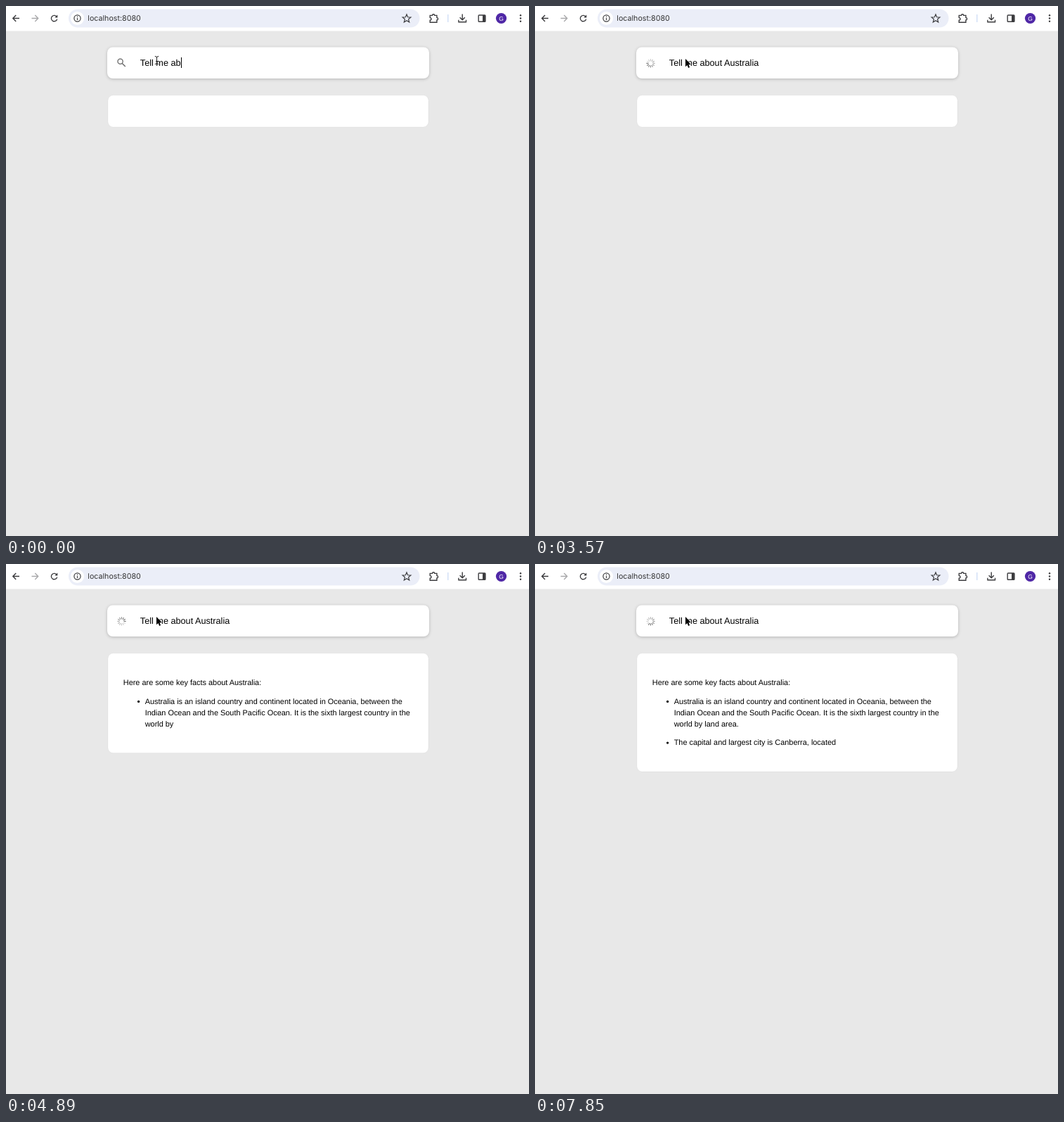
Write an HTML page that moves like this. It is 744 by 753 pixels and loops after 8000 ms.

```html
<!DOCTYPE html>
<html lang="en">
<head>
<meta charset="utf-8">
<title>Ask</title>
<style>
  html, body { margin: 0; width: 100%; height: 100%; overflow: hidden; background: #e8e8e8; }
  svg { display: block; }
  text { font-family: "Liberation Sans", Arial, sans-serif; text-rendering: geometricPrecision; white-space: pre; }
  #query { font-size: 12.68px; }
  #answer { font-size: 10.92px; }
  .box { fill: #fff; filter: drop-shadow(0 1px 2px rgba(0, 0, 0, .22)); }
  .line { fill: none; stroke: #3c3c3f; stroke-width: 1.4; }
</style>
</head>
<body>
<svg width="744" height="753" viewBox="0 0 744 753">
  <!-- browser toolbar -->
  <rect width="744" height="35.5" fill="#fff"/>
  <rect x="89" y="4.5" width="499.5" height="26" rx="13" fill="#ebeef8"/>
  <circle cx="101.5" cy="17.5" r="9.5" fill="#fff"/>
  <g class="line">
    <path d="M19 17.5H10M14.2 13.1L9.8 17.5l4.4 4.4"/>
    <path d="M36.5 17.5H45.500M41.300 13.100l4.400 4.400l-4.400 4.400" stroke="#a9a9ab"/>
    <path d="M72.2 15.400A4.200 4.200 0 1 0 72.700 18.600"/>
    <path d="M73.300 12.600v3.900h-3.900z" fill="#3c3c3f" stroke="none"/>
    <circle cx="101.500" cy="17.500" r="4.600" stroke-width="1.200"/>
    <path d="M101.500 16.900v3.100M101.500 14.700v1.300" stroke-width="1.200"/>
    <path d="M570 11.900l1.600 3.900 4.300.300-3.300 2.700 1.100 4.200-3.700-2.300-3.700 2.300 1.100-4.200-3.300-2.700 4.300-.300z" stroke-width="1.200"/>
    <path d="M603.200 13.400h3.300a1.600 1.600 0 0 1 3.200 0h3.200v3.200a1.600 1.600 0 0 1 0 3.400v3.300h-9.700v-3.100a1.800 1.800 0 0 0 0-3.600z"/>
    <path d="M628.800 12v11" stroke="#c8daf6" stroke-width="1.200"/>
    <path d="M649.200 11.500v8M645.600 16.200l3.600 3.600 3.600-3.600M643.900 19.800v3h10.600v-3"/>
    <rect x="672.200" y="13" width="9.700" height="9.200" rx=".8"/>
    <path d="M678 13h4v9.200h-4z" fill="#3c3c3f" stroke="none"/>
  </g>
  <circle cx="704.500" cy="17.500" r="7.600" fill="#4f27a6"/>
  <text x="704.500" y="20.600" font-size="8.500" text-anchor="middle" fill="#fff">G</text>
  <g fill="#3c3c3f">
    <circle cx="732" cy="13.200" r="1.200"/><circle cx="732" cy="17.500" r="1.200"/><circle cx="732" cy="21.800" r="1.200"/>
  </g>
  <text x="116.300" y="21.300" font-size="10.700" fill="#333" style="font-family:Inter,sans-serif">localhost:8080</text>

  <!-- search field -->
  <rect class="box" x="144" y="58.500" width="458" height="44.500" rx="8"/>
  <g id="lens" fill="none" stroke="#666" stroke-width="1.300">
    <circle cx="162.600" cy="78.800" r="3.600"/><path d="M165.300 81.500l4.500 4.500"/>
  </g>
  <g id="spinner" stroke="#444" stroke-width="1.100"></g>
  <text id="query" x="190.800" y="84.600"></text>
  <rect id="caret" y="73" width="1" height="15"/>
  <g id="beam" fill="none">
    <path id="beamPath" d="M211.800 71.500q2.700 0 2.700 1.600v7.800q0 1.600-2.700 1.600M217.200 71.500q-2.700 0-2.700 1.600v7.800q0 1.600 2.700 1.600M213 78.500h3" stroke="#222"/>
  </g>
  <path id="arrow" d="M214 75v11.200l2.500-2.300 1.700 4 1.900-.8-1.700-3.900h3.500z" stroke="#fff" stroke-width=".9" paint-order="stroke"/>

  <!-- answer card -->
  <rect id="card" x="145" y="126.800" width="456" rx="7.500" fill="#fff" stroke="#000" stroke-opacity=".04"/>
  <g id="answer"></g>
</svg>
<script>
const LOOP = 8000, SUBMIT = 2830, TICK = 148.2;
const $ = id => document.getElementById(id);
const query = "Tell me about Australia";

// [time, characters typed]
const typing = [[0, 10], [150, 11], [300, 12], [450, 13], [600, 14], [890, 15],
  [1340, 16], [1490, 17], [1640, 18], [1780, 19], [2080, 21], [2380, 23]];
// [time, words received]
const stream = [[0, 0], [3870, 3], [4020, 7], [4170, 9], [4310, 13], [4460, 19], [4610, 25],
  [4750, 30], [4890, 36], [7550, 38], [7700, 42], [7850, 46]];

// [x, baseline, card bottom, has bullet, text]
const lines = [
  [166.8, 171.9, 209.6, 0, "Here are some key facts about Australia:"],
  [197.7, 198.7, 236.5, 1, "Australia is an island country and continent located in Oceania, between the"],
  [197.7, 214.7, 252.5, 0, "Indian Ocean and the South Pacific Ocean. It is the sixth largest country in the"],
  [197.7, 230.7, 268.5, 0, "world by land area."],
  [197.7, 257.4, 295, 1, "The capital and largest city is Canberra, located"]
].map(([x, y, bottom, bullet, text]) => ({
  bottom, words: text.split(" "),
  label: add($("answer"), "text", { x, y }),
  dot: bullet && add($("answer"), "circle", { cx: 188.6, cy: y - 3.3, r: 1.65 })
}));

const spokes = Array.from({ length: 12 }, (_, i) => add($("spinner"), "path", {
  d: "M164.500 78.400v-3.100", transform: `rotate(${i * 30} 164.500 81.400)`
}));

function add(parent, tag, attrs) {
  const el = document.createElementNS(parent.namespaceURI, tag);
  for (const key in attrs) el.setAttribute(key, attrs[key]);
  return parent.appendChild(el);
}

const valueAt = (steps, t) => steps.filter(s => s[0] <= t).pop()[1];
const show = (el, on) => { el.style.display = on ? "" : "none"; };

function drawSearch(t) {
  const busy = t >= SUBMIT;
  $("query").textContent = query.slice(0, valueAt(typing, t));
  $("caret").setAttribute("x", Math.round(190.8 + $("query").getComputedTextLength()));
  for (const id of ["lens", "caret", "beam"]) show($(id), !busy);
  for (const id of ["spinner", "arrow"]) show($(id), busy);

  // the dark spoke moves on by two places per tick
  const tick = Math.min(53, Math.floor((t + 15) / TICK));
  const head = 7 + 2 * (tick - 29);
  spokes.forEach((spoke, i) => {
    const age = (((head - i) % 12) + 12) % 12;
    spoke.setAttribute("opacity", 0.8 - age * 0.055);
  });
}

function drawAnswer(t) {
  let left = valueAt(stream, t), bottom = 172;
  for (const line of lines) {
    const n = Math.max(0, Math.min(left, line.words.length));
    line.label.textContent = line.words.slice(0, n).join(" ");
    if (line.dot) show(line.dot, n);
    if (n) bottom = line.bottom;
    left -= n;
  }
  $("card").setAttribute("height", bottom - 126.8);
}

const start = performance.now();
function frame() {
  const t = (performance.now() - start) % LOOP;
  drawSearch(t);
  drawAnswer(t);
  requestAnimationFrame(frame);
}
frame();
</script>
</body>
</html>
```
